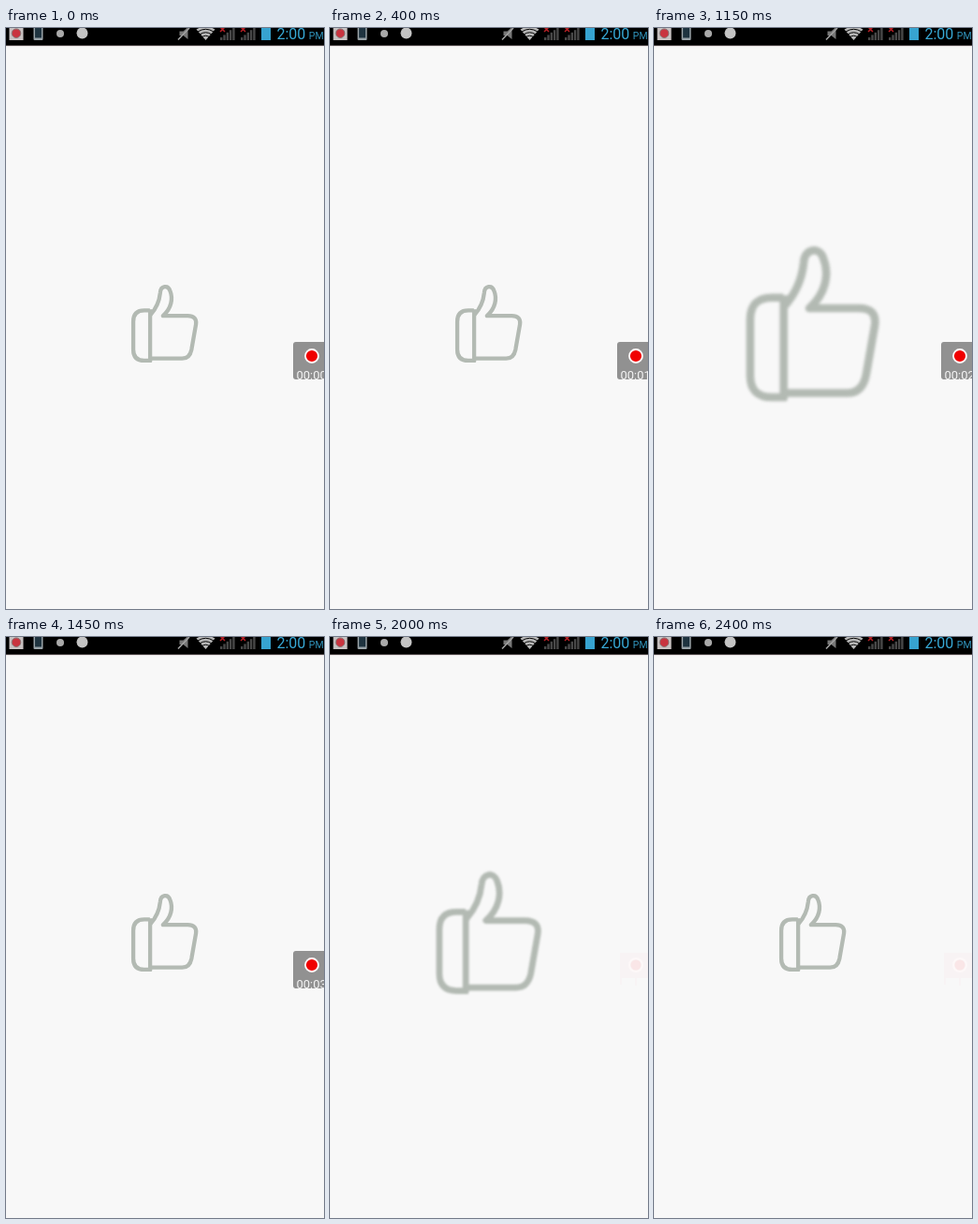
Write an HTML page that moves like this. It is 340x620 px and loops after 2450 ms.

```html
<!DOCTYPE html>
<html lang="en">
<head>
<meta charset="utf-8">
<title>Thumb pulse</title>
<style>
  html, body { margin: 0; width: 100%; height: 100%; overflow: hidden; background: #f8f8f8; }
  svg { display: block; width: 340px; height: 620px; }
  text { font-family: Roboto, "Open Sans", sans-serif; }
</style>
</head>
<body>
<svg viewBox="0 0 340 620">
  <filter id="soft" x="-10%" y="-10%" width="120%" height="120%" color-interpolation-filters="sRGB">
    <feGaussianBlur stdDeviation="1.4"/>
  </filter>
  <rect width="340" height="620" fill="#f8f8f8"/>
  <rect y="18" width="340" height="1" fill="#3a3536"/>
  <rect y="19" width="340" height="1" fill="#e3dddf"/>

  <g id="status">
    <rect width="340" height="18"/>
    <rect x="3.5" y="-2" width="15" height="15" fill="#c8c2c2"/>
    <circle cx="11" cy="5.7" r="4.8" fill="#c9343f" stroke="#8a7676"/>
    <rect x="29.5" y="-2" width="10" height="15" rx="1" fill="#98a2a7"/>
    <rect x="31" y="0" width="7" height="10.5" fill="#1f3440"/>
    <circle cx="58" cy="6" r="4" fill="#aaa"/>
    <circle cx="81.5" cy="5.5" r="6" fill="#c4c4c4"/>
    <path d="M185.500 3.500h4l5-4.500v13l-5-4h-4z" fill="#777"/>
    <path d="M184 12.500 196 0" stroke="#a4a4a4" stroke-width="1.5"/>
    <path d="M203.500 1.500Q213.500-4.500 223.500 1.500L213.500 13z" fill="#b8b8b8"/>
    <g fill="none" stroke="#000" stroke-width="1">
      <path d="M205 4Q213.500-1.500 222 4"/>
      <path d="M207 7Q213.500 2.500 220 7"/>
      <path d="M209 10Q213.500 6.500 218 10"/>
    </g>
    <g id="bars"></g>
    <rect x="273" y="0" width="10" height="13" fill="#37a3d0"/>
    <text x="289.500" y="12" font-size="16" fill="#37a9d6">2:00</text>
    <text x="323.800" y="12" font-size="10.500" fill="#3196bf">PM</text>
  </g>

  <g id="thumb" fill="none" stroke="#b3bab3" stroke-width="8.600" stroke-linejoin="round" filter="url(#soft)">
    <path d="M138 287.500H126Q102.500 287.500 102.500 311V371Q102.500 394.500 126 394.500H142"/>
    <path d="M138.500 285V397"/>
    <path d="M139 297C149 286 158 270 160 250C161 234 177 233 181 245
             C188 262 184 283 166 299H219Q239 299 236.500 317L227 371Q223 390 207 390H142"/>
  </g>

  <g id="recorder">
    <rect x="307" y="335" width="36" height="40" rx="3" fill="#919191"/>
    <circle cx="327" cy="350" r="7" fill="#f00000" stroke="#fff" stroke-width="1.800"/>
    <text id="count" x="310.500" y="374.500" font-size="13" fill="#f4f4f4">00:00</text>
  </g>
  <g id="ghost" fill="#f8f3f4">
    <rect x="310" y="337" width="30" height="27"/>
    <circle cx="327" cy="350" r="7" fill="none" stroke="#fdf8f8" stroke-width="2"/>
    <circle cx="327" cy="350" r="5.500" fill="#fae6e7"/>
    <path d="M310 364h2v7h-2zM326 364h2v8h-2z"/>
  </g>
</svg>

<script>
const $ = id => document.getElementById(id);
const LOOP = 2450, STEP = 50, HIDE = 1850;
const CX = 169.7, CY = 315.4;

// start, rise, fall, extra scale at the peak
const pulses = [
  [25, 150, 220, 1],
  [1010, 150, 230, 1],
  [1914, 150, 290, 0.93]
];
const ticks = [350, 850, 1350];

const ease = p => (1 - Math.cos(Math.PI * p)) / 2;

function scaleAt(t) {
  for (const [start, rise, fall, gain] of pulses) {
    const d = t - start;
    if (d > 0 && d < rise + fall)
      return 1 + gain * (d < rise ? ease(d / rise) : 1 - ease((d - rise) / fall));
  }
  return 1;
}

function draw(t) {
  const s = scaleAt(t) / 2; // the outline is drawn at double size
  $("thumb").setAttribute("transform",
    `translate(${CX} ${CY}) scale(${s}) translate(${-CX} ${-CY})`);
  $("count").textContent = "00:0" + ticks.filter(k => t >= k).length;
  $("recorder").style.display = t < HIDE ? "" : "none";
  $("ghost").style.display = t < HIDE ? "none" : "";
}

function signal(x) {
  let out = "";
  for (let i = 0; i < 5; i++)
    out += `<rect x="${x + i * 3.3}" y="${10 - i * 2.6}" width="2.4" height="${3 + i * 2.6}" fill="#484848"/>`;
  return out + `<path d="M${x} -1l5 5m0 -5l-5 5" stroke="#b51f25" stroke-width="1.5"/>`;
}

$("bars").innerHTML = signal(229) + signal(251);

const begin = performance.now();
function tick() {
  const t = (performance.now() - begin) % LOOP;
  draw(Math.floor(t / STEP) * STEP);
  requestAnimationFrame(tick);
}
tick();
</script>
</body>
</html>
```
